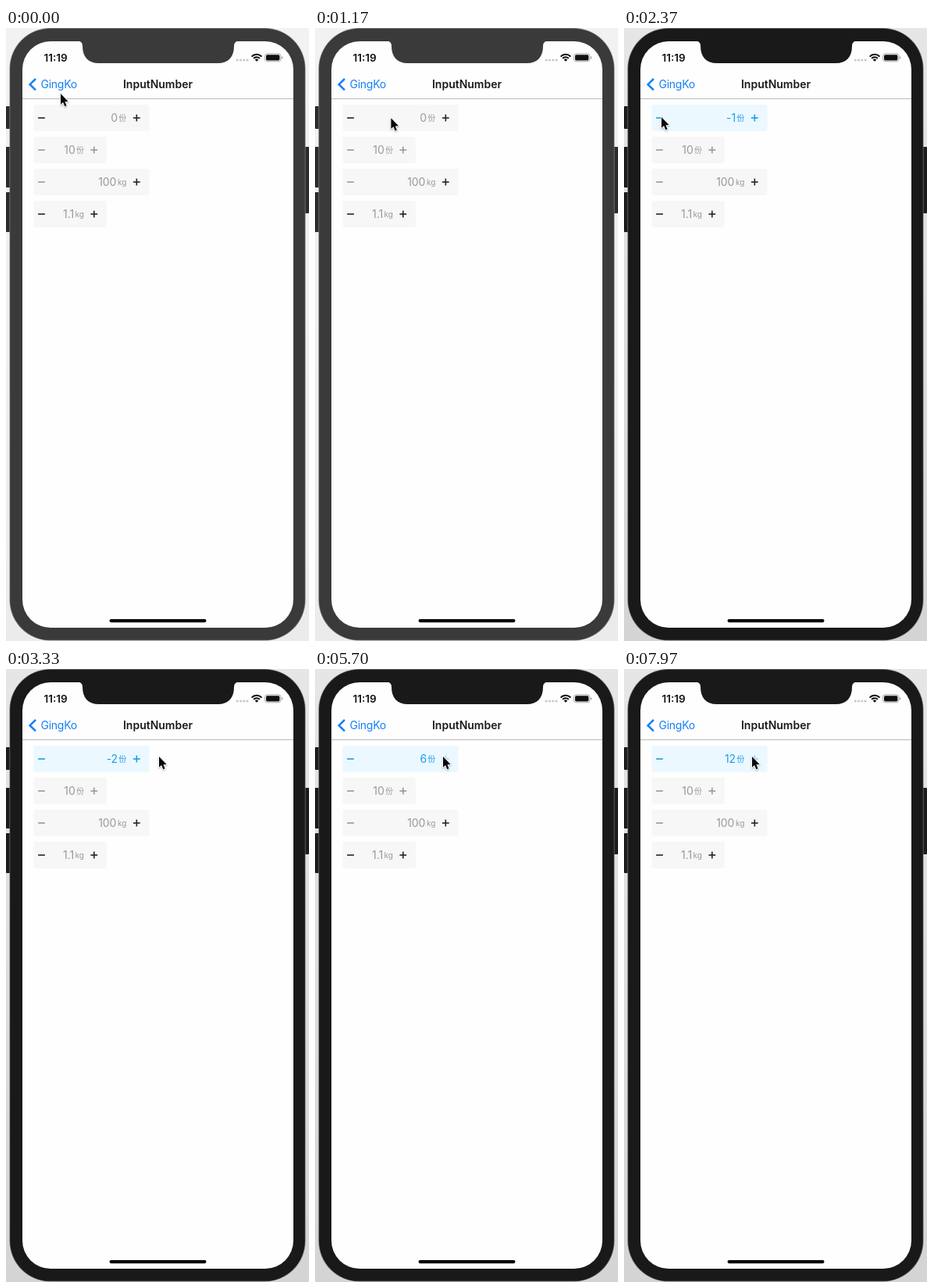
These frames come from a looping animation (388x784 px, 8000 ms). An HTML page with a canvas:

```html
<!DOCTYPE html>
<html lang="en">
<head>
<meta charset="utf-8">
<title>InputNumber</title>
<style>
  html, body { margin: 0; width: 100%; height: 100%; overflow: hidden; background: #f0f0f0; }
  canvas { display: block; width: 388px; height: 784px; }
</style>
</head>
<body>
<canvas id="stage"></canvas>
<script>
const W = 388, H = 784, LOOP = 8000;
const FOCUS_AT = 1870, ACTIVE_AT = 2000;
const BLUE = '#1d9ce9', INK = '#252525', MUTED = '#999999';

const canvas = document.getElementById('stage');
const ratio = window.devicePixelRatio || 1;
canvas.width = W * ratio;
canvas.height = H * ratio;
const ctx = canvas.getContext('2d');
ctx.scale(ratio, ratio);

// Time, x, y of the pointer's resting and turning points.
const path = [
  [30, 70, 84], [630, 119, 114], [900, 126, 116], [1560, 48, 114],
  [2720, 48, 114], [3290, 196, 112], [3420, 196, 112], [3900, 164, 112]
];

// Each click lowers or raises the first value by one.
const clicks = [2000, 2570, 4060, 4280, 4640];
for (let i = 0; i < 9; i++) clicks.push(4800 + i * 217.5);
clicks.push(7100, 7640, 8010);
const isMinus = time => time < 3000;

const clamp = v => Math.max(0, Math.min(1, v));
const smooth = v => v * v * (3 - 2 * v);

function pointerAt(t) {
  let i = 0;
  while (i < path.length - 1 && path[i + 1][0] <= t) i++;
  const a = path[i], b = path[i + 1] || a;
  const k = smooth(clamp((t - a[0]) / (b[0] - a[0] || 1)));
  return [a[1] + (b[1] - a[1]) * k, a[2] + (b[2] - a[2]) * k];
}

function valueAt(t) {
  return clicks.reduce((sum, c) => c <= t ? sum + (isMinus(c) ? -1 : 1) : sum, 0);
}

// A pressed sign fades quickly, then recovers after release.
function pressAlpha(t, minus) {
  let alpha = 1;
  for (const c of clicks) {
    if (isMinus(c) !== minus) continue;
    const fade = t < c ? clamp((t - c + 110) / 110) : 1 - clamp((t - c) / 250);
    alpha = Math.min(alpha, 1 - 0.8 * fade);
  }
  return alpha;
}

function box(x, y, w, h, r, fill) {
  ctx.beginPath();
  ctx.roundRect(x, y, w, h, r);
  ctx.fillStyle = fill;
  ctx.fill();
}

function text(str, x, y, size, color, { weight = 400, align = 'left', spacing = 0 } = {}) {
  ctx.font = `${weight} ${size}px Inter, "Noto Sans CJK SC", "Noto Sans CJK", sans-serif`;
  ctx.letterSpacing = spacing + 'px';
  ctx.textAlign = align;
  ctx.fillStyle = color;
  ctx.fillText(str, x, y);
}

function sign(x, y, color, plus, alpha = 1) {
  ctx.globalAlpha = alpha;
  ctx.fillStyle = color;
  ctx.fillRect(x - 4.4, y - 0.8, 8.8, 1.6);
  if (plus) ctx.fillRect(x - 0.8, y - 4.4, 1.6, 8.8);
  ctx.globalAlpha = 1;
}

function drawBody(focused) {
  const shade = ctx.createLinearGradient(0, 0, 0, H);
  shade.addColorStop(0, focused ? '#e6e6e6' : '#f2f2f2');
  shade.addColorStop(1, focused ? '#d4d4d4' : '#ebebeb');
  ctx.fillStyle = shade;
  ctx.fillRect(0, 0, W, H);

  const key = focused ? '#1c1c1c' : '#2b2b2b';
  box(0, 100, 7, 29, 1, key);
  box(0, 152, 7, 52, 1, key);
  box(0, 210, 7, 51, 1, key);
  box(381, 152, 7, 85, 1, key);

  box(4.5, 0, 379, 783.5, 52, focused ? '#777777' : '#858585');
  box(5.2, 0.7, 377.6, 782.1, 51.5, focused ? '#191919' : '#3a3a3a');
  box(21, 17, 347, 750, 36, '#fefefe');

  ctx.beginPath();
  ctx.moveTo(92, 16.5);
  ctx.quadraticCurveTo(98, 17, 98, 23);
  ctx.bezierCurveTo(98, 37, 105, 45, 119, 45);
  ctx.lineTo(271, 45);
  ctx.bezierCurveTo(285, 45, 292, 37, 292, 23);
  ctx.quadraticCurveTo(292, 17, 298, 16.5);
  ctx.closePath();
  ctx.fillStyle = focused ? '#191919' : '#3a3a3a';
  ctx.fill();
}

function drawStatus() {
  text('11:19', 48.5, 42.5, 13.5, '#111111', { weight: 600 });

  ctx.fillStyle = '#c9c9c9';
  for (let i = 0; i < 4; i++) {
    ctx.beginPath();
    ctx.arc(296.2 + i * 4.3, 41, 1.6, 0, Math.PI * 2);
    ctx.fill();
  }

  ctx.strokeStyle = ctx.fillStyle = '#111111';
  ctx.lineWidth = 2;
  for (const r of [5.4, 8.8]) {
    ctx.beginPath();
    ctx.arc(321, 42.6, r, -Math.PI * 0.76, -Math.PI * 0.24);
    ctx.stroke();
  }
  ctx.beginPath();
  ctx.moveTo(321, 42.8);
  ctx.arc(321, 42.8, 3.1, -Math.PI * 0.76, -Math.PI * 0.24);
  ctx.fill();

  ctx.beginPath();
  ctx.roundRect(331.6, 32.9, 20.2, 9.9, 2.8);
  ctx.strokeStyle = '#a8a8a8';
  ctx.lineWidth = 1;
  ctx.stroke();
  box(333, 34.3, 17.4, 7.1, 1.6, '#111111');
  box(352.9, 36.2, 1.4, 3.4, 0.7, '#a8a8a8');
}

function drawNav() {
  ctx.beginPath();
  ctx.moveTo(38, 65);
  ctx.lineTo(30.6, 72.2);
  ctx.lineTo(38, 79.4);
  ctx.strokeStyle = '#1380f5';
  ctx.lineWidth = 2.5;
  ctx.stroke();
  text('GingKo', 44.5, 77, 14, '#1380f5', { spacing: -0.25 });
  text('InputNumber', 194.5, 77, 14, '#1a1a1a', { weight: 600, align: 'center' });
  ctx.fillStyle = '#bcbcbc';
  ctx.fillRect(21, 90, 347, 1);
}

function drawInput(y, wide, value, unit, style = {}) {
  const { fill = '#f7f7f7', color = MUTED, minus = INK, plus = INK,
          minusAlpha = 1, plusAlpha = 1 } = style;
  const mid = y + 17, right = wide ? 154.3 : 100;
  box(35.5, y, wide ? 148 : 93.5, 34, 3, fill);
  sign(45.5, mid, minus, false, minusAlpha);
  sign(wide ? 167.3 : 112.8, mid, plus, true, plusAlpha);
  text(unit, right, mid + 3.6, 10, color, { align: 'right' });
  text(value, right - (unit === 'kg' ? 13 : 11.3), mid + 5, 14, color,
    { align: 'right', spacing: -0.1 });
}

function drawPointer(x, y) {
  const shape = [[0, 0], [0, 13.8], [3.1, 11], [5.3, 16.2], [7.6, 15.2], [5.4, 10.2], [9.7, 10]];
  ctx.save();
  ctx.translate(x, y);
  ctx.beginPath();
  shape.forEach(p => ctx.lineTo(...p));
  ctx.closePath();
  ctx.lineJoin = 'round';
  ctx.shadowColor = 'rgba(0,0,0,.3)';
  ctx.shadowBlur = 2;
  ctx.shadowOffsetY = 1;
  ctx.strokeStyle = '#ffffff';
  ctx.lineWidth = 1.8;
  ctx.stroke();
  ctx.shadowColor = 'transparent';
  ctx.fillStyle = '#080808';
  ctx.fill();
  ctx.restore();
}

function draw(t) {
  const active = t >= ACTIVE_AT;
  const tint = active ? { fill: '#ecf8ff', color: BLUE, minus: BLUE, plus: BLUE } : {};

  drawBody(t >= FOCUS_AT);
  drawStatus();
  drawNav();
  drawInput(98, true, String(valueAt(t)), '份', {
    ...tint,
    minusAlpha: pressAlpha(t, true),
    plusAlpha: pressAlpha(t, false)
  });
  drawInput(139, false, '10', '份', { minus: MUTED, plus: MUTED });
  drawInput(180, true, '100', 'kg', { minus: MUTED });
  drawInput(221, false, '1.1', 'kg');
  box(132.5, 756, 124, 4.2, 2.1, '#080808');
  drawPointer(...pointerAt(t));
}

const start = performance.now();
function tick() {
  draw((performance.now() - start) % LOOP);
  requestAnimationFrame(tick);
}
tick();
</script>
</body>
</html>
```
